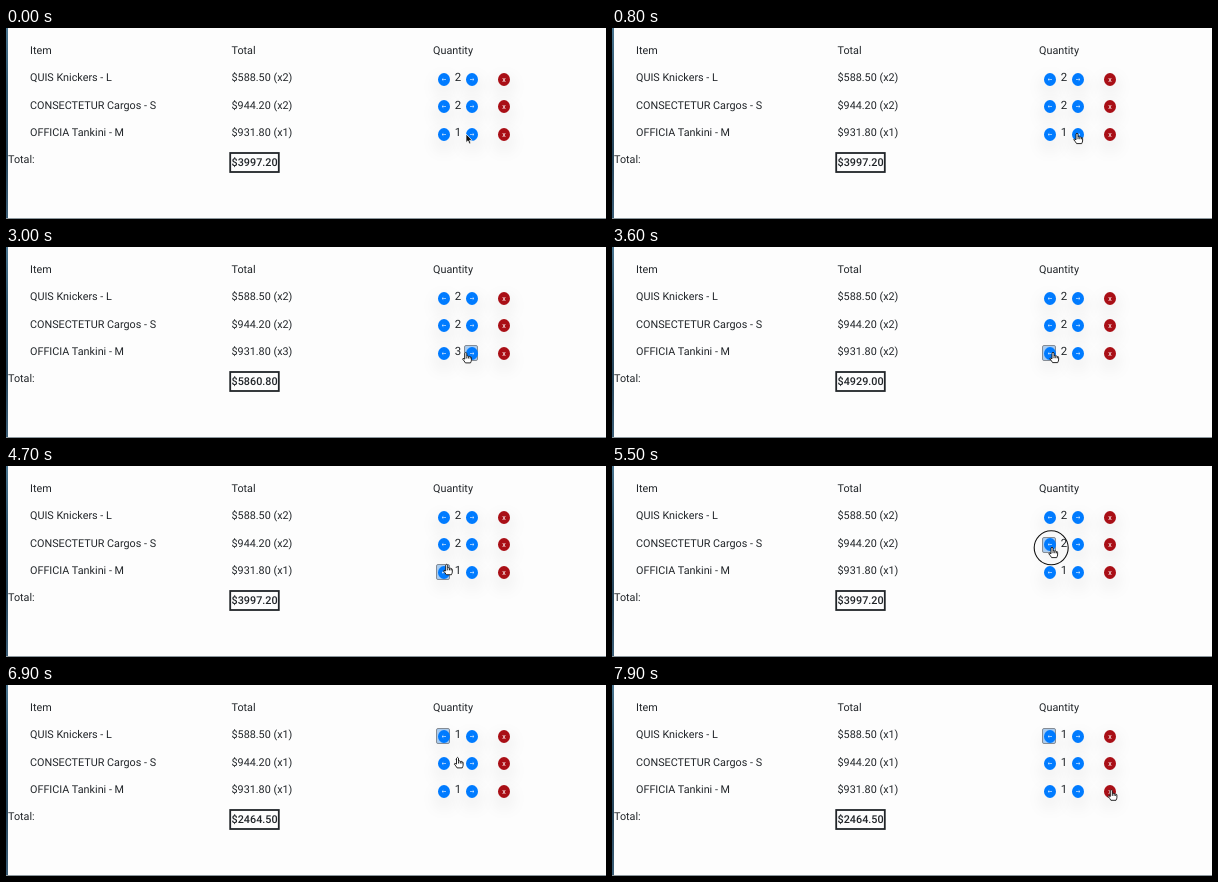
Write an HTML page that moves like this. It is 600 px wide and 191 px high and loops after 8 s.

```html
<!DOCTYPE html>
<html lang="en">
<head>
<meta charset="utf-8">
<title>Cart</title>
<style>
  html, body { margin: 0; width: 100%; height: 100%; overflow: hidden; background: #fdfdfd; }
  #stage { position: relative; width: 600px; height: 191px; overflow: hidden; background: #fdfdfd; }
  #stage > * { position: absolute; }
  svg { display: block; }
  .edge { left: 0; top: 0; width: 1.5px; height: 191px;
    background: linear-gradient(#4a7590, #2f566f 30%, #27465c 65%, #3c5f78); }
  .foot { left: 0; top: 190px; width: 600px; height: 1px; background: #8c979d; }
  .btn { width: 12px; height: 13px; border-radius: 50%; background: #007bff; }
  .btn.del { background: #a90f16; }
  .btn text { font: 700 5.5px Roboto, sans-serif; fill: #f3dcdc; text-anchor: middle; }
  .shade { width: 12px; height: 13px; border-radius: 50%; box-shadow: 0 7px 18px rgba(0, 0, 0, .15); }
  .focus { width: 12px; height: 14px; border: 1.5px solid #858c95; border-radius: 2px; background: #a9cbee; }
  .layer { left: 0; top: 0; }
  .layer text { font: 10.8px Roboto, sans-serif; fill: #212529; text-rendering: geometricPrecision; }
  .layer .qty { font-size: 11.4px; text-anchor: middle; }
  .layer .sum { font-weight: 500; text-anchor: middle; }
</style>
</head>
<body>
<div id="stage"></div>
<script>
const stage = document.getElementById('stage');
const items = [
  { name: 'QUIS Knickers - L', price: 588.5, start: 2, y: 51 },
  { name: 'CONSECTETUR Cargos - S', price: 944.2, start: 2, y: 78.7 },
  { name: 'OFFICIA Tankini - M', price: 931.8, start: 1, y: 106.3 }
];
const LOOP = 8000, LEFT = 437.5, RIGHT = 465.5, DEL = 498;

// The quantity changes when the button is released.
const clicks = [
  { down: 1300, up: 1500, row: 2, step: 1, r: 14 },
  { down: 2000, up: 2100, row: 2, step: 1, r: 20 },
  { down: 3500, up: 3600, row: 2, step: -1, r: 17 },
  { down: 3900, up: 4000, row: 2, step: -1, r: 17 },
  { down: 5400, up: 5600, row: 1, step: -1, r: 17 },
  { down: 6100, up: 6300, row: 0, step: -1, r: 17 }
];

// Pointer tip: time, x, y
const path = [
  [0, 460, 106], [500, 465, 105], [2600, 465, 105], [3000, 459.8, 105.3],
  [3500, 441, 105], [4500, 441, 105], [5200, 440, 81], [5700, 440, 81],
  [6000, 439.5, 50.5], [6700, 440, 50.5], [6900, 451.5, 72.3], [7200, 480, 93],
  [7600, 498, 104], [7800, 499.3, 104.7], [8000, 499.3, 104.7]
];

function add(cls, x, y, html = '') {
  const el = document.createElement('div');
  el.className = cls;
  if (x !== undefined) el.style.left = x + 'px';
  if (y !== undefined) el.style.top = y + 'px';
  el.innerHTML = html;
  return stage.appendChild(el);
}

function button(x, y, mark, cls = '') {
  add('btn ' + cls, x - 6, y - 6.5, `<svg width="12" height="13">${mark}</svg>`);
}

const arrow = d => `<path d="M4 6.5H8M${6 + d * .7} 5.4L${6 + d * 2} 6.5L${6 + d * .7} 7.6"
  fill="none" stroke="#d5e9ff" stroke-width=".7"/>`;
const label = (x, y, text = '', attrs = '') => `<text x="${x}" y="${y}" ${attrs}>${text}</text>`;

add('edge');
add('foot');
for (const it of items)
  for (const x of [LEFT, RIGHT, DEL]) add('shade', x - 6, it.y - 6.5);
const focus = add('focus');
for (const it of items) {
  button(LEFT, it.y, arrow(-1));
  button(RIGHT, it.y, arrow(1));
  button(DEL, it.y, '<text x="6" y="8.5">X</text>', 'del');
}

const rows = items.map(it =>
  label(24, it.y + 1.9, it.name) +
  label(225.5, it.y + 1.9, '', 'class="cost"') +
  label(451.9, it.y + 2, '', 'class="qty"')).join('');

add('layer', 0, 0, `<svg width="600" height="191">
  ${label(24, 25.9, 'Item')}${label(225.5, 25.9, 'Total')}${label(427, 25.9, 'Quantity')}
  ${rows}${label(2, 135.4, 'Total:')}
  <rect x="224.2" y="125" width="48.6" height="19" fill="none" stroke="#212529" stroke-width="1.8"/>
  ${label(248.6, 138.4, '', 'class="sum"')}
  <circle id="ring" cx="-.8" cy=".8" fill="none" stroke="#111" stroke-width="1.1"/>
  <path id="arrow" d="M0 0V8.6L2 6.8L3.4 10L4.9 9.3L3.6 6.3H6.2Z" fill="#111" stroke="#fff" stroke-width=".7"/>
  <path id="hand" d="M-1 1Q0-.8 1 1V4Q2 3 2.8 4.2Q3.8 3.3 4.4 4.7Q5.6 4.2 5.6 5.6V8Q5.5 9 4.7 10.6H-.4Q-1.6 8.6-3.2 6.8Q-3.3 5.3-1 6.8Z
    M1 4.2V6.2M2.8 4.4V6.2M4.4 4.9V6.3" fill="#fff" stroke="#111" stroke-width=".9" stroke-linejoin="round"/>
</svg>`);
const [ring, pointer, hand] = ['ring', 'arrow', 'hand'].map(id => document.getElementById(id));
const costs = document.querySelectorAll('.cost');
const qtys = document.querySelectorAll('.qty');
const sum = document.querySelector('.sum');

function tipAt(t) {
  const i = path.findIndex(p => p[0] > t);
  const [t0, x0, y0] = path[i - 1], [t1, x1, y1] = path[i];
  const k = (t - t0) / (t1 - t0);
  return [x0 + (x1 - x0) * k, y0 + (y1 - y0) * k];
}

function setText(el, text) {
  if (el.textContent !== text) el.textContent = text;
}

function show(el, on) {
  el.style.display = on ? '' : 'none';
}

function render(t) {
  const counts = items.map(it => it.start);
  let last = null;
  for (const c of clicks) {
    if (t >= c.up) counts[c.row] += c.step;
    if (t >= c.down) last = c;
  }
  let total = 0;
  items.forEach((it, i) => {
    total += it.price * counts[i];
    setText(costs[i], `$${it.price.toFixed(2)} (x${counts[i]})`);
    setText(qtys[i], String(counts[i]));
  });
  setText(sum, '$' + total.toFixed(2));

  show(focus, last);
  if (last) {
    focus.style.left = (last.step > 0 ? RIGHT : LEFT) - 7.5 + 'px';
    focus.style.top = items[last.row].y - 8.2 + 'px';
  }

  const [x, y] = tipAt(t);
  for (const el of [ring, pointer, hand]) el.setAttribute('transform', `translate(${x} ${y})`);
  const pressed = last && t < last.up;
  if (pressed) ring.setAttribute('r', last.r);
  show(ring, pressed);
  show(pointer, t < 200);
  show(hand, t >= 200);
}

const begin = performance.now();
function tick() {
  const t = (performance.now() - begin) % LOOP;
  render(Math.floor(t / 100) * 100);
  requestAnimationFrame(tick);
}
render(0);
requestAnimationFrame(tick);
</script>
</body>
</html>
```
